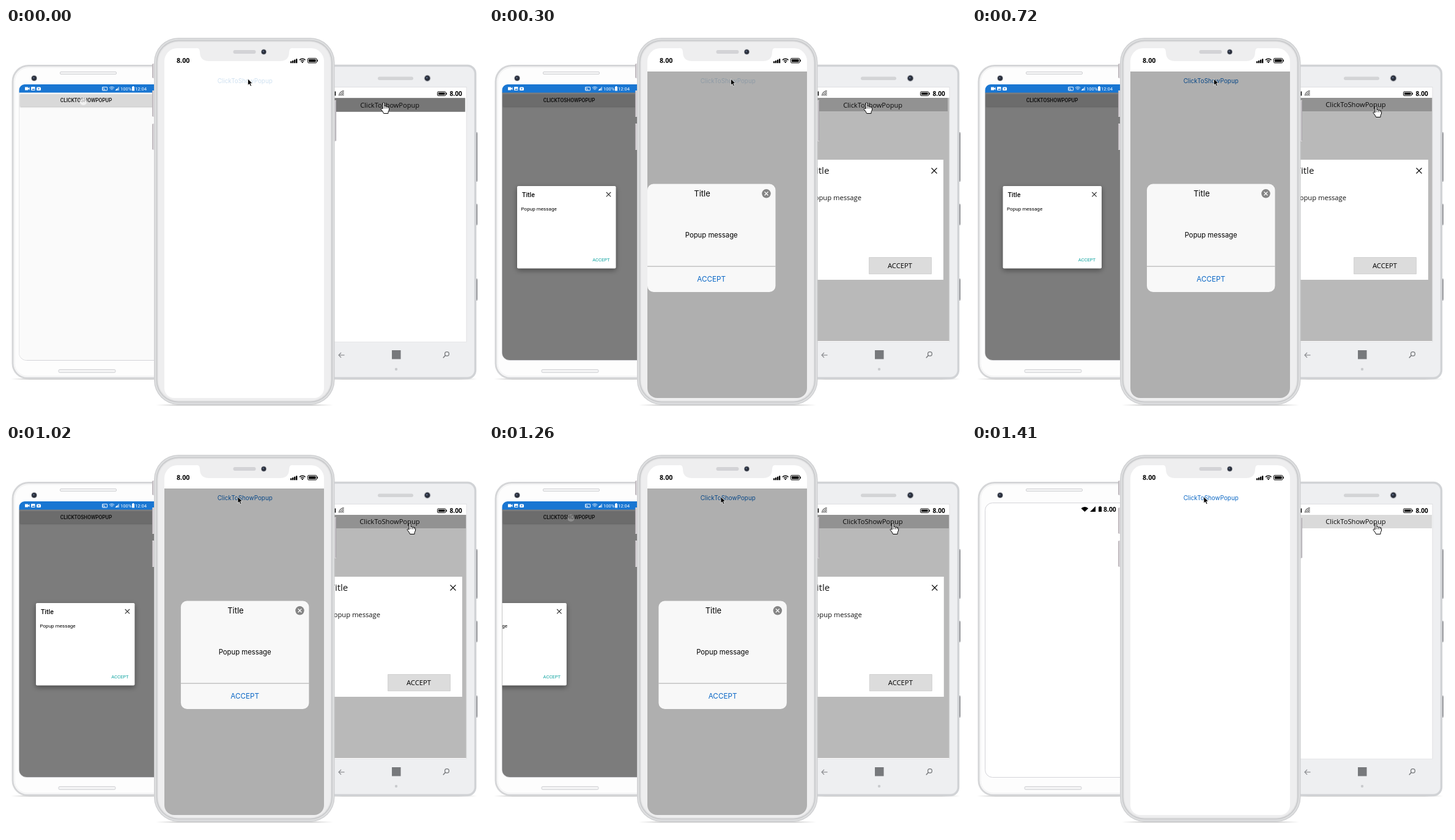
Write an HTML page with a canvas that moves like this. It is 780 px wide and 635 px high and loops after 1650 ms.

```html
<!DOCTYPE html>
<html lang="en">
<head>
<meta charset="utf-8">
<title>Popups on three phones</title>
<style>
html, body { margin: 0; width: 100%; height: 100%; overflow: hidden; background: #fff; }
canvas { display: block; width: 780px; height: 635px; }
</style>
</head>
<body>
<canvas id="stage" width="780" height="635"></canvas>
<script>
const LOOP = 1650, STEP = 30;
const ctx = document.getElementById('stage').getContext('2d');
const ROBOTO = 'Roboto, sans-serif';
const INTER = 'Inter, sans-serif';
const OPEN = '"Open Sans", sans-serif';

const clamp = v => Math.max(0, Math.min(1, v));
const ramp = (t, a, b) => clamp((t - a) / (b - a));
const smooth = (t, a, b) => { const p = ramp(t, a, b); return p * p * (3 - 2 * p); };
const mix = (a, b, p) => a + (b - a) * p;
const grow = (size, t, at, tau) => size * Math.exp((t - at) / tau);

function rect(x, y, w, h, fill) {
  ctx.fillStyle = fill;
  ctx.fillRect(x, y, w, h);
}
function round(x, y, w, h, r, fill, stroke, lw = 1) {
  ctx.beginPath();
  ctx.roundRect(x, y, w, h, r);
  if (fill) { ctx.fillStyle = fill; ctx.fill(); }
  if (stroke) { ctx.strokeStyle = stroke; ctx.lineWidth = lw; ctx.stroke(); }
}
function disc(x, y, r, fill) {
  ctx.beginPath();
  ctx.arc(x, y, r, 0, Math.PI * 2);
  ctx.fillStyle = fill;
  ctx.fill();
}
function poly(points, fill, stroke, lw = 1) {
  ctx.beginPath();
  for (let i = 0; i < points.length; i += 2) ctx.lineTo(points[i], points[i + 1]);
  if (fill) { ctx.closePath(); ctx.fillStyle = fill; ctx.fill(); }
  if (stroke) { ctx.strokeStyle = stroke; ctx.lineWidth = lw; ctx.stroke(); }
}
function text(s, x, y, font, fill, align = 'left') {
  ctx.font = font;
  ctx.fillStyle = fill;
  ctx.textAlign = align;
  ctx.fillText(s, x, y);
}
function cross(x, y, r, color, lw) {
  poly([x - r, y - r, x + r, y + r], null, color, lw);
  poly([x + r, y - r, x - r, y + r], null, color, lw);
}
function clipped(x, y, w, h, r, draw) {
  ctx.save();
  ctx.beginPath();
  ctx.roundRect(x, y, w, h, r);
  ctx.clip();
  draw();
  ctx.restore();
}
function withShadow(color, blur, dy, draw) {
  ctx.save();
  ctx.shadowColor = color;
  ctx.shadowBlur = blur;
  ctx.shadowOffsetY = dy;
  draw();
  ctx.restore();
}
function camera(x, y, r) {
  disc(x, y, r, '#b9bbc0');
  disc(x, y, r * .8, '#2b303c');
  disc(x - r * .15, y - r * .15, r * .25, '#56647f');
}
function battery(x, y, w, h) {
  round(x + .5, y + .5, w - 2.5, h - 1, 1.5, null, '#000');
  rect(x + 2, y + 2, w - 5.5, h - 4, '#000');
  rect(x + w - 1.2, y + h / 2 - 1.5, 1.2, 3, '#000');
}
function arcs(x, y, radii, from, to, color, lw) {
  ctx.strokeStyle = color;
  ctx.lineWidth = lw;
  for (const r of radii) {
    ctx.beginPath();
    ctx.arc(x, y, r, from, to);
    ctx.stroke();
  }
}
function wedge(x, y, r, color) {
  ctx.beginPath();
  ctx.moveTo(x, y);
  ctx.arc(x, y, r, -Math.PI * .76, -Math.PI * .24);
  ctx.closePath();
  ctx.fillStyle = color;
  ctx.fill();
}
function floorShade(x, y, w) {
  const g = ctx.createLinearGradient(x, 0, x + w, 0);
  g.addColorStop(0, 'rgba(190,190,190,0)');
  g.addColorStop(.12, 'rgba(190,190,190,.8)');
  g.addColorStop(.88, 'rgba(190,190,190,.8)');
  g.addColorStop(1, 'rgba(190,190,190,0)');
  rect(x, y, w, 2, g);
}
function arrowCursor(x, y) {
  ctx.save();
  ctx.translate(x, y);
  const shape = [0, 0, 0, 10.5, 2.4, 8.2, 4.2, 12, 6, 11.2, 4.3, 7.6, 7.4, 7.4];
  poly([...shape, 0, 0], '#000', '#fff', .7);
  ctx.restore();
}
function handCursor(x, y) {
  ctx.save();
  ctx.translate(x, y);
  ctx.lineJoin = 'round';
  ctx.beginPath();
  ctx.moveTo(-1.4, 10.5);
  ctx.lineTo(-1.4, 1.2);
  ctx.quadraticCurveTo(0, -1, 1.4, 1.2);
  ctx.lineTo(1.4, 6.2);
  ctx.quadraticCurveTo(3, 5.2, 4.1, 6.8);
  ctx.quadraticCurveTo(5.8, 6, 6.8, 7.4);
  ctx.quadraticCurveTo(9, 7, 9.2, 9.2);
  ctx.quadraticCurveTo(9.4, 13, 7.6, 15.2);
  ctx.lineTo(7.4, 18);
  ctx.lineTo(.2, 18);
  ctx.quadraticCurveTo(-1, 15, -4.4, 11);
  ctx.quadraticCurveTo(-4.2, 8.6, -1.4, 10.5);
  ctx.closePath();
  ctx.fillStyle = '#fff';
  ctx.fill();
  ctx.strokeStyle = '#000';
  ctx.lineWidth = 1;
  ctx.stroke();
  for (const sx of [1.4, 4.1, 6.8]) poly([sx, 6.8, sx, 10], null, '#000', .8);
  ctx.restore();
}

// Left phone
function leftBody() {
  floorShade(8, 572, 260);
  round(11, 61.5, 260, 510, [26, 0, 0, 24], '#fdfdfd', '#d5d6d8', 3);
  round(14, 64.5, 260, 504, [23, 0, 0, 21], null, '#eeeeef', 1);
  round(88.5, 71.5, 92, 4, 1.5, '#f3f3f4', '#d0d1d4');
  round(86, 557.5, 93, 5, 2, '#f3f3f4', '#d0d1d4');
  camera(46, 82, 5);
  round(21.5, 94.5, 260, 448, 12, '#fff', '#d3d3d8');
}
function leftStatus() {
  rect(21, 92, 221, 13.5, '#1976d2');
  rect(31, 96.5, 5, 5, '#fff');
  poly([35.5, 99, 38.5, 96.5, 38.5, 101.5], '#fff');
  round(41, 96, 6.5, 6, 1, '#fff');
  poly([42, 101, 43.5, 99, 44.5, 100, 45.5, 98.5, 47, 101], '#1976d2');
  round(50, 96.5, 7, 5.5, 1.5, '#fff');
  poly([52.7, 97.7, 55, 99.2, 52.7, 100.7], '#1976d2');
  round(157.5, 96.5, 8, 5.5, .5, null, '#fff', .9);
  arcs(158, 102, [2, 4], -Math.PI / 2, 0, '#fff', .8);
  arcs(173, 102, [2, 4, 6], -Math.PI * .75, -Math.PI * .25, '#fff', .8);
  poly([178.5, 102, 185, 102, 185, 95.5], 'rgba(255,255,255,.55)');
  poly([178.5, 102, 182, 102, 182, 98.5], '#fff');
  text('100%', 187, 102, '7.6px ' + ROBOTO, '#fff');
  rect(206, 96, 4, 6.5, '#fff');
  rect(207, 95, 2, 1, '#fff');
  text('12:04', 211, 102, '7.7px ' + ROBOTO, '#fff');
}
function leftIdleStatus() {
  wedge(184.3, 109, 8, '#000');
  poly([193, 109, 202, 109, 202, 100], '#000');
  rect(207, 101, 5, 8, '#000');
  rect(208.3, 100, 2.4, 1, '#000');
  text('8.00', 215, 109, 'bold 10.4px ' + OPEN, '#000');
}
function leftPopup(x) {
  withShadow('rgba(0,0,0,.4)', 9, 3, () => round(x, 258, 161.5, 134.5, 2, '#fff'));
  text('Title', x + 8, 276, '500 10.5px ' + ROBOTO, '#111');
  cross(x + 149.5, 271.7, 3.7, '#333', 1.1);
  text('Popup message', x + 6.5, 297.6, '8.1px ' + ROBOTO, '#000');
  text('ACCEPT', x + 123.2, 380.8, '7.6px ' + ROBOTO, '#0da3a0');
}
function leftPhone(t) {
  leftBody();
  if (t >= 1320) return leftIdleStatus();
  clipped(21.5, 92, 260, 450, [9, 0, 0, 12], () => {
    rect(21, 92, 230, 451, '#fafafa');
    withShadow('rgba(0,0,0,.25)', 2, .5, () => rect(23, 108, 230, 20, '#d9d9d9'));
    text('CLICKTOSHOWPOPUP', 131, 121.2, '500 8.3px ' + ROBOTO, '#111', 'center');
    if (t < 120) disc(126.5, 120, 6, 'rgba(255,255,255,.65)');
    rect(21, 105, 230, 438, `rgba(0,0,0,${.5 * ramp(t, 0, 120)})`);
    if (t >= 1050) disc(134, 119, 6, 'rgba(190,190,190,.4)');
    leftStatus();
    if (t >= 60) leftPopup(50.5 - grow(4.5, -t, -300, 64) - grow(19, t, 1170, 60));
  });
}

// Right phone
function rightBody() {
  floorShade(520, 572, 250);
  for (const [y, h] of [[170, 81], [287, 35], [409, 36]]) {
    round(767, y, 4, h, 1, '#a9abaf');
    rect(769.5, y + 2, 1, h - 4, '#77797d');
  }
  round(500, 61.5, 267.5, 510, [0, 13, 13, 0], '#eeeff1', '#d1d3d6', 3.5);
  round(608, 79.5, 58, 5.5, 2.7, '#d3d4d6');
  camera(689, 82, 5.5);
  rect(520, 96, 233.5, 416.5, '#dfe0e2');
  rect(520, 97, 232.5, 415, '#fff');
  poly([553.5, 534, 544, 534], null, '#8a8c8f', 1.2);
  poly([548, 530, 544, 534, 548, 538], null, '#8a8c8f', 1.2);
  rect(631, 526, 14.5, 14.5, '#77797c');
  arcs(721, 532, [3.4], 0, Math.PI * 2, '#77797c', 1.3);
  poly([718.4, 534.6, 714.8, 538.4], null, '#77797c', 1.5);
  disc(638, 557, 2.2, '#c9cbce');
  rect(537.5, 103.5, 1.7, 7, '#000');
  arcs(552.5, 110.5, [1.3, 3.5, 5.7, 7.9], Math.PI, Math.PI * 1.5, '#222', 1);
  battery(705, 103.5, 16, 7.5);
  text('8.00', 725.5, 111, 'bold 10.2px ' + OPEN, '#000');
}
function rightPopup(x) {
  rect(x, 215, 216, 196, '#fff');
  text('Title', x - .3, 238, '15px ' + OPEN, '#111');
  cross(x + 201, 233, 4.5, '#111', 1.2);
  text('Popup message', x - 1, 280.5, '11.2px ' + OPEN, '#111');
  round(x + 94.5, 374.5, 102, 27, 0, '#dcdcdc', '#d2d2d2');
  text('ACCEPT', x + 145, 392, '11.25px ' + OPEN, '#000', 'center');
}
function rightPhone(t) {
  rightBody();
  const pressed = t < 420;
  const open = t >= 210 && t < 1410;
  if (open) rect(520, 114, 232.5, 397, `rgba(0,0,0,${.275 * ramp(t, 150, 270)})`);
  const edge = pressed ? 750 : 752;
  rect(530, 114, edge - 530, 22, open ? '#929292' : pressed ? '#777' : '#dadada');
  if (t < 210) round(530, 114.5, 220.5, 22, 0, null, '#8e8e8e');
  const [size, base] = pressed ? [11, 130] : [11.2, 129.3];
  text('ClickToShowPopup', 627.5, base, size + 'px ' + OPEN, '#0a0a0a', 'center');
  if (open) rightPopup(530 - grow(3, -t, -300, 40) - grow(7, t, 1320, 52));
  const p = smooth(t, 510, 690);
  handCursor(mix(617.5, 660.5, p), mix(121.5, 127.5, p));
}

// Middle phone
function midBody() {
  floorShade(245, 614.5, 290);
  for (const [y, h] of [[58, 24], [102, 43], [156, 43]]) {
    round(239, y, 5, h, 1, '#dcd8db');
    rect(239.3, y + 1, 1, h - 2, '#aaa3a8');
  }
  round(535, 118, 5, 67, 1, '#dcd8db');
  rect(538.7, 119, 1, 65, '#96939a');
  const layers = [[0, '#d0d1d3'], [1.5, '#dfe0e1'], [3.5, '#cbccce'], [5.5, '#e5e5e6'], [7, '#eeeeef']];
  for (const [d, color] of layers) {
    round(242 + d, 16 + d, 295.5 - 2 * d, 599 - 2 * d, 40 - d, color);
  }
  round(259, 33, 261, 571, [21, 21, 16, 16], '#fff');
}
function notch() {
  ctx.beginPath();
  ctx.moveTo(311, 32);
  ctx.quadraticCurveTo(317, 33, 317, 39);
  ctx.quadraticCurveTo(317, 54, 332, 54);
  ctx.lineTo(448, 54);
  ctx.quadraticCurveTo(463, 54, 463, 39);
  ctx.quadraticCurveTo(463, 33, 469, 32);
  ctx.fillStyle = '#eeeeef';
  ctx.fill();
  round(371.5, 36, 37, 6, 3, '#d3d3d6');
  camera(421.5, 39, 4.7);
}
function midStatus() {
  text('8.00', 279, 57, 'bold 10.7px ' + OPEN, '#000');
  [3, 4.2, 5.6, 7].forEach((h, i) => rect(465 + i * 3, 57.3 - h, 2.3, h, '#000'));
  arcs(484.7, 57, [3.8, 6.8], -Math.PI * .75, -Math.PI * .25, '#000', 1.4);
  wedge(484.7, 57.3, 2.3, '#000');
  battery(493, 49, 17, 8.5);
}
function midPopup(x) {
  round(x, 254.5, 209.5, 176.5, 10, '#f8f8f8');
  const mid = x + 104.7;
  text('Title', x + 89.5, 275.3, '13px ' + INTER, '#000', 'center');
  disc(x + 194.5, 270.3, 7.2, '#858585');
  cross(x + 194.5, 270.3, 2.9, '#fff', 1.3);
  text('Popup message', mid, 341.8, '11.3px ' + INTER, '#000', 'center');
  rect(x, 388.6, 209.5, 1, '#a9a9a9');
  text('ACCEPT', mid, 413.8, '11.7px ' + INTER, '#0a67c6', 'center');
}
function midPhone(t) {
  midBody();
  const p = smooth(t, 390, 570);
  const blue = `rgb(${mix(207, 12, p)},${mix(225, 104, p)},${mix(241, 196, p)})`;
  text('ClickToShowPopup', 390.7, 90.4, '9.9px ' + INTER, blue, 'center');
  if (t >= 210 && t < 1410) {
    clipped(259, 71, 261, 533, [0, 0, 16, 16], () => {
      rect(259, 71, 261, 533, `rgba(0,0,0,${.314 * ramp(t, 150, 270)})`);
      midPopup(286 - grow(27, -t, -300, 64) - grow(1.5, t, 1170, 51.5));
    });
  }
  notch();
  midStatus();
  const m = smooth(t, 720, 810);
  arrowCursor(mix(395.5, 379, m), mix(83, 84.5, m));
}

function draw(now) {
  const t = Math.floor((now % LOOP) / STEP) * STEP;
  rect(0, 0, 780, 635, '#fff');
  leftPhone(t);
  rightPhone(t);
  midPhone(t);
}

const start = performance.now();
function tick() {
  draw(performance.now() - start);
  requestAnimationFrame(tick);
}
tick();
</script>
</body>
</html>
```
